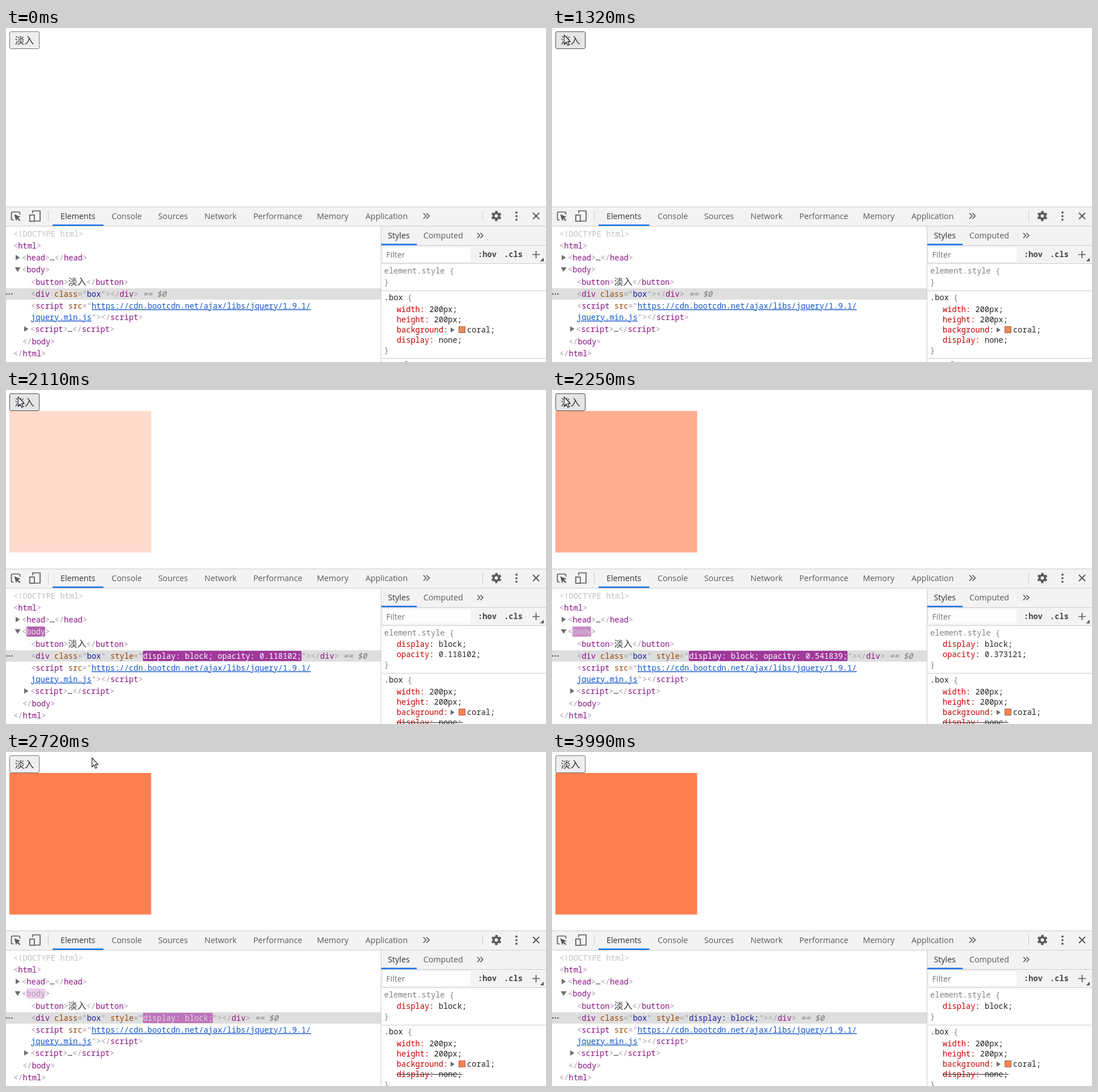
These frames come from a looping animation (951x589 px, 4360 ms). An HTML page:

```html
<!DOCTYPE html>
<html lang="zh">
<head>
<meta charset="utf-8">
<title>fadeIn demo</title>
<style>
html, body { margin: 0; width: 100%; height: 100%; overflow: hidden; background: #fff; }
svg { display: block; }
text { white-space: pre; }
.code { font: 13.7px "Noto Sans Mono", "Noto Sans CJK SC", monospace; fill: #a894a6; }
.n { fill: #881280; }
.a { fill: #994500; }
.v { fill: #1a1aa6; }
.link { fill: #1155cc; text-decoration: underline 1px; text-underline-offset: 2px; }
.dark { fill: #222; }
.dim { fill: #808080; }
.prop { fill: #c80000; }
.doctype { fill: #c0c0c0; }
.eq { fill: #777; font-style: italic; }
.cjk { font-family: "Noto Sans CJK SC", sans-serif; font-weight: 300; fill: #333; }
.ui { font: 14.25px "Open Sans", sans-serif; fill: #5a5a5a; }
.ui .on { fill: #333; }
.toggle { font-weight: 600; fill: #444; }
.icon { fill: none; stroke: #5a5a5a; stroke-width: 1.7; }
.solid { fill: #5a5a5a; }
.arrow { fill: #6e6e6e; }
.rule { stroke: #ccc; }
#button { fill: #efefef; stroke: #767676; }
#button.hover { fill: #e5e5e5; stroke: #4f4f4f; }
#button.press { fill: #f5f5f5; stroke: #8d8d8d; }

/* flashes are held still; the script sets how old each one is */
.flash, .ink {
  animation: flash 1.4s cubic-bezier(0, 0, .2, 1) paused;
  animation-delay: calc(var(--age, -1) * -1ms);
}
.flash { fill: transparent; }
.ink { animation-name: ink; }
@keyframes flash {
  from { fill: rgb(158 54 153); }
  80% { fill: rgb(245 219 244); }
}
@keyframes ink {
  from { fill: #fff; }
  80% { fill: #a894a6; }
}
</style>
</head>
<body>
<svg width="951" height="589" viewBox="0 0 951 589">
  <!-- page -->
  <rect id="button" x="6.5" y="6.5" width="52" height="30" rx="2.5"/>
  <text class="cjk" x="15.5" y="28" font-size="17">淡入</text>
  <rect id="box" x="6" y="37" width="249.6" height="249.6" fill="#ff7f50"/>

  <!-- toolbar -->
  <rect y="315" width="951" height="34" fill="#f3f3f3"/>
  <path class="rule" d="M0 315.5H951M0 349.5H951M74.5 322V341M839.5 322V341"/>
  <g class="icon">
    <path d="M13.5 338.5H11.5Q9.5 338.5 9.5 336.5V326.5Q9.5 324.5 11.5 324.5H22.5Q24.5 324.5 24.5 326.5V329"/>
    <path d="M47 326.5V322.5H60V340.5H50"/>
    <rect x="41.8" y="329.8" width="8" height="11"/>
    <path d="M735 326.5L740 331.5L735 336.5M740.5 326.5L745.5 331.5L740.5 336.5"/>
    <path d="M928 326L939 337M939 326L928 337" stroke-width="2"/>
    <circle cx="863.5" cy="331.5" r="4.8" style="stroke-width: 3.8"/>
    <circle cx="863.5" cy="331.5" r="7.6" style="stroke-width: 2.8" stroke-dasharray="4.18 3.78" stroke-dashoffset="-1.9"/>
  </g>
  <path class="solid" d="M14.5 328.5L25.5 333L21.3 334.8L25.3 338.9L23.6 340.6L19.6 336.5L17.8 340.5Z"/>
  <g class="solid">
    <circle cx="899" cy="325.5" r="1.9"/><circle cx="899" cy="331.8" r="1.9"/><circle cx="899" cy="338.1" r="1.9"/>
  </g>
  <rect x="82" y="346.5" width="89.5" height="2.5" fill="#1a73e8"/>
  <g class="ui">
    <text class="on" x="96" y="337">Elements</text>
    <text x="186" y="337">Console</text>
    <text x="268" y="337">Sources</text>
    <text x="349.5" y="337">Network</text>
    <text x="435.5" y="337">Performance</text>
    <text x="547.5" y="337">Memory</text>
    <text x="633" y="337">Application</text>
  </g>

  <!-- element tree -->
  <rect y="459" width="660" height="20" fill="#dedede"/>
  <g class="solid"><circle cx="1.3" cy="469" r="1.3"/><circle cx="5.8" cy="469" r="1.3"/><circle cx="10.3" cy="469" r="1.3"/></g>
  <path class="arrow" d="M17 400L24.5 404.7L17 409.5ZM15.5 422H25.5L20.5 430ZM32 526L39.5 530.7L32 535.5Z"/>
  <rect class="flash" id="bodyFlash" x="36" y="417" width="33" height="18" rx="2"/>
  <rect class="flash" id="valueFlash" x="241" y="460" height="18" rx="2"/>
  <g class="code">
    <text class="doctype" x="13" y="368">&lt;!DOCTYPE html&gt;</text>
    <text x="13" y="389">&lt;<tspan class="n">html</tspan>&gt;</text>
    <text x="28" y="410">&lt;<tspan class="n">head</tspan>&gt;<tspan class="dark">…</tspan>&lt;/<tspan class="n">head</tspan>&gt;</text>
    <text x="28" y="431">&lt;<tspan class="n ink" id="bodyInk">body</tspan>&gt;</text>
    <text x="44" y="453">&lt;<tspan class="n">button</tspan>&gt;<tspan class="cjk" font-size="16" x="109.5">淡入</tspan><tspan x="141.5">&lt;/</tspan><tspan class="n">button</tspan>&gt;</text>
    <text x="44" y="474">&lt;<tspan class="n">div</tspan> <tspan class="a">class</tspan>="<tspan class="v">box</tspan>"<tspan id="attr"> <tspan class="a">style</tspan>="<tspan class="v ink" id="value"></tspan>"</tspan>&gt;&lt;/<tspan class="n">div</tspan>&gt;<tspan class="eq"> == $0</tspan></text>
    <text x="44" y="495">&lt;<tspan class="n">script</tspan> <tspan class="a">src</tspan>="<tspan class="link">https://cdn.bootcdn.net/ajax/libs/jquery/1.9.1/</tspan></text>
    <text x="44" y="515"><tspan class="link">jquery.min.js</tspan>"&gt;&lt;/<tspan class="n">script</tspan>&gt;</text>
    <text x="43" y="536">&lt;<tspan class="n">script</tspan>&gt;<tspan class="dark">…</tspan>&lt;/<tspan class="n">script</tspan>&gt;</text>
    <text x="29" y="558">&lt;/<tspan class="n">body</tspan>&gt;</text>
    <text x="13" y="579">&lt;/<tspan class="n">html</tspan>&gt;</text>
  </g>

  <!-- styles pane -->
  <rect x="660" y="350" width="291" height="65" fill="#f3f3f3"/>
  <rect x="664" y="387" width="154" height="25" fill="#fff"/>
  <path class="rule" d="M660.5 349V589M661 383.5H951M661 415.5H951"/>
  <rect x="661" y="380.5" width="62.5" height="2.5" fill="#1a73e8"/>
  <g class="ui">
    <text class="on" x="672.5" y="371">Styles</text>
    <text x="735" y="371">Computed</text>
    <text x="669.5" y="405" fill="#757575">Filter</text>
  </g>
  <path class="icon" d="M830 361.5L834.5 366L830 370.5M835.5 361.5L840 366L835.5 370.5M927 399.5H940M933.5 393V406"/>
  <path class="solid" d="M947 405V411.5H940.5Z"/>
  <g class="code">
    <text class="toggle" x="831" y="404">:hov</text>
    <text class="toggle" x="877" y="404">.cls</text>
    <text class="dim" x="666" y="433">element.style {</text>
    <text id="row1" x="688" y="453"><tspan class="prop">display</tspan><tspan class="dark">: block;</tspan></text>
    <text id="row2" x="688" y="471"><tspan class="prop">opacity</tspan><tspan class="dark" id="opacity"></tspan></text>
    <g id="rules">
      <text class="dim" x="666" y="453">}</text>
      <path class="rule" d="M661 463.5H951M661 582.5H951"/>
      <text class="dark" x="666" y="480">.box <tspan class="dim">{</tspan></text>
      <text x="688" y="501"><tspan class="prop">width:</tspan><tspan class="dark"> 200px;</tspan></text>
      <text x="688" y="519"><tspan class="prop">height:</tspan><tspan class="dark"> 200px;</tspan></text>
      <text x="688" y="537"><tspan class="prop">background:</tspan><tspan class="dark" x="812">coral;</tspan></text>
      <path class="arrow" d="M783 528L790 532.5L783 537Z"/>
      <rect id="swatch" x="797.5" y="526.5" width="11" height="11" stroke="#a8674c"/>
      <text x="688" y="555"><tspan class="prop">display:</tspan><tspan class="dark"> none;</tspan></text>
      <path id="strike" stroke="#222" d="M688 550.5H804"/>
      <text class="dim" x="666" y="573">}</text>
      <path stroke="#666" d="M703 588.5H707"/>
    </g>
  </g>

  <path id="cursor" fill="#fff" stroke="#1c1c28" stroke-width="1.1" d="M.5 .5V16.2L4.1 12.8L6.7 18.7L9 17.7L6.5 11.9H11.2Z"/>
</svg>

<script>
const LOOP = 4360, CHAR = 8.22;
const PRESS = 1780, RELEASE = 1870, FADE = 1897, SHOWN = 2020, DONE = 2570;

// time, x, y of the pointer tip
const path = [
  [0, -99, -99],
  [600, 839, 162], [680, 668, 96], [760, 490, 46], [850, 320, 16], [930, 182, 5], [1010, 82, 1], [1090, 18, 0],
  [1170, 20, 6], [1250, 21, 10], [1320, 21, 12],
  [2570, 23, 12], [2640, 66, 11], [2720, 151, 10], [2810, 258, 10], [2880, 416, 17], [2960, 493, 16], [3040, 609, 24],
  [3130, 690, 42], [3200, 760, 75], [3280, 810, 106], [3360, 838, 138], [3440, 866, 208], [3520, 884, 283], [3590, 891, 323],
  [3660, 898, 382], [3740, 904, 445], [3820, 907, 506], [3900, 908, 562], [3990, -99, -99]
];
// time, then the fade's age as shown in the tree and in the styles pane
const fades = [
  [0, 0, 0], [SHOWN, 50, 50], [2110, 134, 134], [2180, 234, 134], [2250, 316, 251],
  [2330, 400, 316], [2410, 484, 400], [2480, 567, 484]
];

const $ = id => document.getElementById(id);
const latest = (list, t) => list.findLast(row => row[0] <= t);
const swing = ms => .5 - Math.cos(Math.min(Math.max(ms / 600, 0), 1) * Math.PI) / 2;
const digits = ms => +swing(ms).toFixed(6);
const show = (id, on) => { $(id).style.display = on ? '' : 'none'; };
const setText = (id, s) => { if ($(id).textContent !== s) $(id).textContent = s; };
const setAge = (ms, ...ids) => ids.forEach(id => $(id).style.setProperty('--age', ms));

function draw(t) {
  const [moved, x, y] = latest(path, t);
  const [faded, treeMs, paneMs] = latest(fades, t);
  const tick = Math.max(moved, faded);
  const shown = t >= SHOWN, done = t >= DONE;

  $('cursor').setAttribute('transform', `translate(${x} ${y})`);
  $('button').setAttribute('class',
    t >= PRESS && t < RELEASE ? 'press' : t >= 1170 && t < 2640 ? 'hover' : '');
  $('box').style.opacity = shown ? swing(tick - FADE) : 0;

  const value = done ? 'display: block;' : `display: block; opacity: ${digits(treeMs)};`;
  setText('value', value);
  setText('opacity', `: ${digits(paneMs)};`);
  $('valueFlash').setAttribute('width', value.length * CHAR);
  show('attr', shown);
  show('row1', shown);
  show('row2', shown && !done);
  show('strike', shown);
  $('rules').setAttribute('transform', `translate(0 ${!shown ? 0 : done ? 18 : 36})`);
  $('swatch').setAttribute('fill', shown ? '#ff8250' : '#e8895c');

  setAge(shown ? tick - SHOWN + 10 : -1, 'bodyFlash', 'bodyInk');
  setAge(done ? tick - DONE : shown ? 5 : -1, 'valueFlash', 'value');
}

const start = performance.now();
function frame() {
  draw((performance.now() - start) % LOOP);
  requestAnimationFrame(frame);
}
draw(0);
requestAnimationFrame(frame);
</script>
</body>
</html>
```
